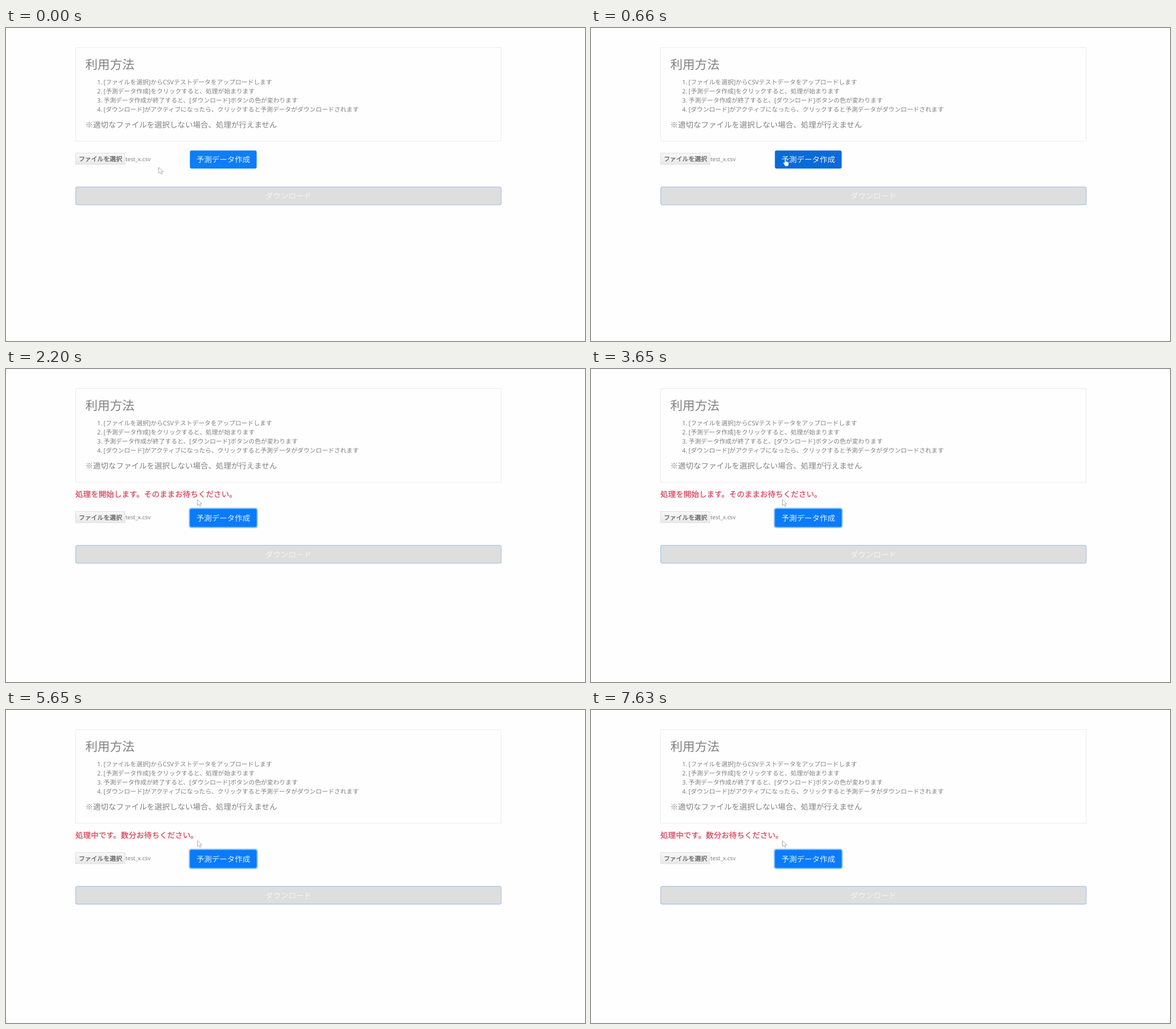
These frames come from a looping animation (1018x550 px, 8 s). An HTML page:

```html
<!DOCTYPE html>
<html lang="ja">
<head>
<meta charset="utf-8">
<title>予測データ作成</title>
<style>
  html, body { margin: 0; width: 100%; height: 100%; overflow: hidden; background: #fefefe; }
  svg { display: block; width: 1018px; height: 550px; }
  text {
    font: 13.5px "Noto Sans CJK JP", "Noto Sans CJK", sans-serif;
    fill: #808080;
    white-space: pre;
    text-rendering: geometricPrecision;
  }
  .title { font-size: 21.6px; }
  .steps text, .file { font-family: "Noto Sans", "Noto Sans CJK JP", "Noto Sans CJK", sans-serif; }
  .steps text { font-size: 10.8px; }
  .file { font-size: 9.9px; }
  .choose { font-size: 10.9px; fill: #666; stroke: #666; stroke-width: .35px; }
  .middle { text-anchor: middle; }
  #message { font-size: 13.58px; fill: #d5405a; stroke: #d5405a; stroke-width: .25px; }
</style>
</head>
<body>
<svg viewBox="0 0 1018 550">
  <defs>
    <linearGradient id="face" x2="0" y2="1">
      <stop stop-color="#f8f8f8"/>
      <stop offset="1" stop-color="#e9e9e9"/>
    </linearGradient>
  </defs>

  <rect x="122.5" y="34.5" width="748" height="164.5" fill="#fefefe" stroke="#ececec"/>
  <text class="title" x="139.5" y="72">利用方法</text>
  <g class="steps" id="steps"></g>
  <text x="139.5" y="174.5">※適切なファイルを選択しない場合、処理が行えません</text>
  <text id="message" x="122" y="225"></text>

  <g id="form">
    <rect x="122.5" y="220" width="86.5" height="19.5" fill="url(#face)" stroke="#dedede"/>
    <text class="choose middle" x="166" y="234.2">ファイルを選択</text>
    <text class="file" x="210" y="233.6">test_x.csv</text>

    <rect id="ring" x="321.4" y="213.2" width="121.2" height="35.8" rx="4.5" fill="#8cc3fb"/>
    <rect id="button" x="323.3" y="215.2" width="117.4" height="31.8" rx="3"/>
    <text class="middle" x="382" y="236.3" style="fill:#e6f1ff">予測データ作成</text>

    <rect x="122.6" y="279.3" width="748" height="31.4" rx="3" fill="#dedede" stroke="#a9c5e6" stroke-width="1.2"/>
    <text class="middle" x="496.5" y="300.2" style="fill:#f5f5f5">ダウンロード</text>
  </g>

  <path id="arrow" d="M.5 .5V10.8L3 8.6 4.9 12.5 6.8 11.6 5 7.9H8.5Z"
        fill="#fefefe" stroke="#a4a4a4" stroke-width=".9" stroke-linejoin="round"/>
  <path id="hand" transform="translate(337.5 229.5)"
        d="M3 8V1.5Q3 .4 4 .4T5 1.5V5Q6.2 4.4 6.8 5.4 8 4.9 8.5 5.9 10 5.6 10 7.2V9.5Q10 11 9 13.2H4Q2.4 10.6 .7 8.6 .2 7.5 1.2 7.2 2 7 3 8Z"
        fill="#fff" stroke="#386fae" stroke-width=".5"/>
</svg>
<script>
const DURATION = 8000;
const $ = id => document.getElementById(id);

const steps = [
  "[ファイルを選択]からCSVテストデータをアップロードします",
  "[予測データ作成]をクリックすると、処理が始まります",
  "予測データ作成が終了すると、[ダウンロード]ボタンの色が変わります",
  "[ダウンロード]がアクティブになったら、クリックすると予測データがダウンロードされます"
];
$("steps").innerHTML = steps.map((step, i) => {
  const y = 99 + i * 16.1;
  return `<text x="160.3" y="${y}">${i + 1}.</text><text x="171.6" y="${y}">${step}</text>`;
}).join("");

const idle = { message: "", shift: 0, color: "#0d7df8" };
const started = { message: "処理を開始します。そのままお待ちください。", shift: 30.5, color: "#0a7bfa", arrow: [336, 229] };
const states = [
  { at: 0, ...idle, arrow: [268, 244.5] },
  { at: 200, ...idle, arrow: [282, 200] },
  { at: 660, ...idle, color: "#0a6ad8" },
  { at: 1190, ...started },
  { at: 4210, ...started, message: "処理中です。数分お待ちください。" }
];

const show = (id, visible) => $(id).setAttribute("visibility", visible ? "visible" : "hidden");

let current;
function draw() {
  const time = performance.now() % DURATION;
  const state = states.findLast(s => s.at <= time);
  if (state !== current) {
    current = state;
    $("message").textContent = state.message;
    $("form").setAttribute("transform", `translate(0 ${state.shift})`);
    $("button").setAttribute("fill", state.color);
    show("ring", state.shift > 0);
    show("arrow", state.arrow);
    show("hand", !state.arrow);
    if (state.arrow) $("arrow").setAttribute("transform", `translate(${state.arrow})`);
  }
  requestAnimationFrame(draw);
}
draw();
</script>
</body>
</html>
```
